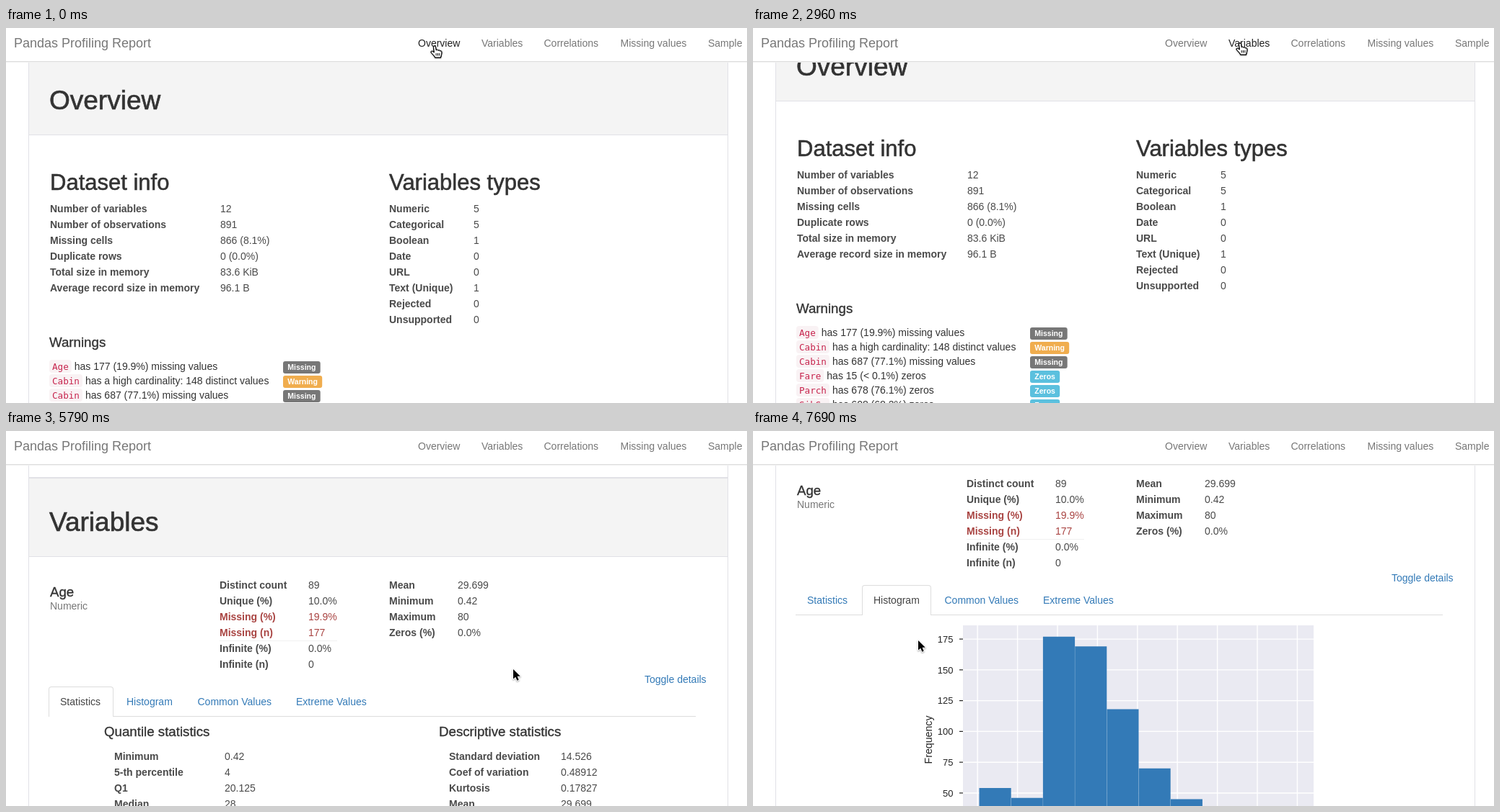
Animation, 1027 px wide and 521 px high, one loop 8000 ms. Source, as an HTML page with a canvas:

```html
<!DOCTYPE html>
<html lang="en">
<head>
<meta charset="utf-8">
<title>Profiling report</title>
<style>
  html, body { margin: 0; width: 100%; height: 100%; overflow: hidden; background: #fff; }
  canvas { display: block; }
</style>
</head>
<body>
<canvas id="stage" width="1027" height="521"></canvas>
<script>
const ctx = document.getElementById('stage').getContext('2d');
const LOOP = 8000, TICK = 148;
const SANS = '"Liberation Sans", Arial, sans-serif';
const MONO = '"DejaVu Sans Mono", monospace';
const BLUE = '#337ab7', DARK_BLUE = '#23527c', RED = '#a94442';
const INK = '#333', LABEL = '#4a4a4a', GREY = '#777', LINE = '#e1e1e6';

// Key poses: [tick, value...]
const SCROLL = [[0, 22], [1, 45], [2, 57], [3, 61], [4, 61], [5, 45], [6, 22], [7, 6], [8, 0],
  [19, 0], [20, 69], [21, 410], [22, 625], [39, 625], [40, 655], [41, 695], [42, 718],
  [49, 718], [50, 735], [51, 756], [52, 766]];
const POINTER = [[0, 594, 25], [4, 594, 25], [8, 330, 287], [9, 330, 287], [13, 230, 154],
  [14, 400, 130], [15, 620, 70], [16, 795, 27], [17, 689, 25], [18, 675, 21], [26, 675, 21],
  [31, 889, 351], [32, 920, 362], [33, 915, 365], [37, 915, 365], [39, 703, 331], [42, 697, 333],
  [45, 300, 318], [46, 225, 300], [47, 203, 291], [49, 203, 291], [52, 229, 291]];
const EXPAND = [[34, 0], [35, 0.15], [36, 0.7], [37, 1]];
const SWITCH_TAB = 49;

const NAV = [['Overview', 571], ['Variables', 659], ['Correlations', 745.5],
  ['Missing values', 851.5], ['Sample', 973]];
const TABS = [['Statistics', 59, 90], ['Histogram', 151, 96],
  ['Common Values', 249.5, 135], ['Extreme Values', 386, 128]];
const DATASET = [['Number of variables', '12'], ['Number of observations', '891'],
  ['Missing cells', '866 (8.1%)'], ['Duplicate rows', '0 (0.0%)'],
  ['Total size in memory', '83.6 KiB'], ['Average record size in memory', '96.1 B']];
const TYPES = [['Numeric', '5'], ['Categorical', '5'], ['Boolean', '1'], ['Date', '0'],
  ['URL', '0'], ['Text (Unique)', '1'], ['Rejected', '0'], ['Unsupported', '0']];
const WARNINGS = [['Age', 'has 177 (19.9%) missing values', 'Missing'],
  ['Cabin', 'has a high cardinality: 148 distinct values', 'Warning'],
  ['Cabin', 'has 687 (77.1%) missing values', 'Missing'],
  ['Fare', 'has 15 (< 0.1%) zeros', 'Zeros'],
  ['Parch', 'has 678 (76.1%) zeros', 'Zeros'],
  ['SibSp', 'has 608 (68.2%) zeros', 'Zeros'],
  ['Ticket', 'has a high cardinality: 681 distinct values', 'Warning']];
const BADGE = { Missing: '#777', Warning: '#f0ad4e', Zeros: '#5bc0de' };
const AGE = [['Distinct count', '89'], ['Unique (%)', '10.0%'], ['Missing (%)', '19.9%', RED],
  ['Missing (n)', '177', RED], ['Infinite (%)', '0.0%'], ['Infinite (n)', '0']];
const AGE_RANGE = [['Mean', '29.699'], ['Minimum', '0.42'], ['Maximum', '80'], ['Zeros (%)', '0.0%']];
const CABIN = [['Distinct count', '148', RED], ['Unique (%)', '16.6%'],
  ['Missing (%)', '77.1%', RED], ['Missing (n)', '687', RED]];
const CABIN_VALUES = [['G6', 4], ['C23 C25 C27', 4], ['B96 B98', 4],
  ['Other values (144)', 192, '#999'], ['(Missing)', 687, RED]];
const QUANTILES = [['Minimum', '0.42'], ['5-th percentile', '4'], ['Q1', '20.125'],
  ['Median', '28'], ['Q3', '38'], ['95-th percentile', '56'], ['Maximum', '80'],
  ['Range', '79.58'], ['Interquartile range', '17.875']];
const DESCRIPTIVE = [['Standard deviation', '14.526'], ['Coef of variation', '0.48912'],
  ['Kurtosis', '0.17827'], ['Mean', '29.699'], ['MAD', '11.323'], ['Skewness', '0.38911'],
  ['Sum', '21205'], ['Variance', '211.02'], ['Memory size', '7.0 KiB']];
const AGE_COUNTS = [54, 46, 177, 169, 118, 70, 45, 24, 9, 2];

const ARROW = new Path2D('M0 0V13.6L3.2 10.7L5.4 15.8L7.7 14.8L5.6 9.8H9.8Z');
const HAND = new Path2D('M-1.5 1.2C-1.2-.4 1-.4 1.4 1.2L2.2 6C3 5 4.6 5.2 5 6.4' +
  'C6 5.6 7.4 6 7.6 7.2C8.6 6.6 9.8 7.2 9.8 8.6C10 12 9 13 8.4 16H.8' +
  'C0 13.5-3 11.5-4.8 8.8C-5.2 7.4-3.6 6.8-2.4 7.8L-.6 9Z');
const KNUCKLES = new Path2D('M2.2 10V13.5M4.5 10V13.5M6.8 10V13.5');

function pose(keys, tick) {
  const next = keys.findIndex(key => key[0] > tick);
  if (next === 0) return keys[0].slice(1);
  if (next < 0) return keys[keys.length - 1].slice(1);
  const a = keys[next - 1], b = keys[next];
  const p = (tick - a[0]) / (b[0] - a[0]);
  return a.slice(1).map((v, i) => v + (b[i + 1] - v) * p);
}

function rect(x, y, w, h, color, radius = 0) {
  ctx.fillStyle = color;
  ctx.beginPath();
  ctx.roundRect(x, y, w, h, radius);
  ctx.fill();
}

// y is the middle of the capitals
function text(s, x, y, { size = 14, color = INK, bold = false, align = 'left', family = SANS } = {}) {
  ctx.font = `${bold ? 'bold ' : ''}${size}px ${family}`;
  ctx.fillStyle = color;
  ctx.textAlign = align;
  ctx.fillText(s, x, Math.round(y + size * 0.36));
  return ctx.measureText(s).width;
}

function heading(s, x, y, size) {
  text(s, x, y, { size });
  ctx.strokeStyle = INK;
  ctx.lineWidth = size * 0.018;
  ctx.strokeText(s, x, Math.round(y + size * 0.36));
}

function rotated(s, x, y, angle, size) {
  ctx.save();
  ctx.translate(x, y);
  ctx.rotate(angle);
  text(s, 0, 0, { size, align: 'center', color: '#262626' });
  ctx.restore();
}

function table(rows, x, valueX, y) {
  rows.forEach(([label, value, color], i) => {
    text(label, x, y + 22 * i, { bold: true, color: color || LABEL });
    text(value, valueX, y + 22 * i, { color: color || LABEL });
  });
}

function clipped(x, y, w, h, draw) {
  ctx.save();
  ctx.beginPath();
  ctx.rect(x, y, w, h);
  ctx.clip();
  draw();
  ctx.restore();
}

function sectionHeader(title, y) {
  rect(31, y, 970, 110, '#f4f4f4');
  rect(31, y, 970, 1, LINE);
  rect(31, y + 109, 970, 1, LINE);
  heading(title, 60, y + 61, 37);
}

function overview() {
  sectionHeader('Overview', 61);
  heading('Dataset info', 61, 236, 31);
  heading('Variables types', 531, 236, 31);
  table(DATASET, 61, 297, 273);
  table(TYPES, 531, 648, 273);
  heading('Warnings', 60, 458, 18.7);
  WARNINGS.forEach(([name, message, kind], i) => {
    const y = 492 + 20 * i;
    ctx.font = `12.6px ${MONO}`;
    const width = ctx.measureText(name).width;
    rect(60, y - 9, width + 8, 18, '#f9f2f4', 4);
    text(name, 64, y + 0.5, { size: 12.6, color: '#c7254e', family: MONO });
    text(message, 72 + width, y);
    ctx.font = `bold 10.5px ${SANS}`;
    rect(384, y - 7, ctx.measureText(kind).width + 12.6, 17, BADGE[kind], 3);
    text(kind, 390.3, y + 1.5, { size: 10.5, bold: true, color: '#fff' });
  });
}

function bars(x, base, width, scale) {
  AGE_COUNTS.forEach((count, i) => {
    const left = x + i * width;
    rect(left, base - count * scale, width, count * scale, BLUE);
    if (i) rect(left - 0.25, base - Math.min(count, AGE_COUNTS[i - 1]) * scale, 0.5, 300, 'rgba(255,255,255,.3)');
  });
}

function miniHistogram() {
  clipped(780, 200, 180, 104.5, () => bars(792, 304.5, 14.45, 0.467));
  [['0', 792], ['50', 882]].forEach(([label, x]) => {
    rect(x - 0.5, 304, 1, 5, INK);
    rotated(label, x - 0.5, 324.5, -Math.PI / 4, 11);
  });
}

function histogram(dy) {
  const base = 729.5 + dy;
  rect(291, 411 + dy, 486, 335, '#eaeaf2');
  for (let i = 0; i < 9; i++) rect(310.5 + i * 55.4, 411 + dy, 1.4, 335, '#fff');
  for (let v = 0; v <= 175; v += 25) {
    const y = base - v * 1.711;
    rect(291, y - 0.7, 486, 1.4, '#fff');
    rect(286, y - 0.6, 5, 1.2, '#262626');
    text(v, 277.5, y, { size: 13, align: 'right', color: '#262626' });
  }
  clipped(291, 411 + dy, 486, 318.5, () => bars(313.5, base, 44.2, 1.711));
  rotated('Frequency', 243, 570 + dy, -Math.PI / 2, 14.2);
}

function details(top, active, hovered) {
  const line = top + 41;
  rect(59, line, 897, 1, '#ddd');
  TABS.forEach(([label, x, width], i) => {
    let color = BLUE;
    if (i === active) {
      rect(x, top, width, 42, '#ddd', [4, 4, 0, 0]);
      rect(x + 1, top + 1, width - 2, 41, '#fff', [3, 3, 0, 0]);
      color = '#444';
    } else if (i === hovered) {
      rect(x, top, width, 41, '#eee', [4, 4, 0, 0]);
      color = DARK_BLUE;
    }
    text(label, x + 16, top + 21, { color });
  });
  if (active === 1) return histogram(top - 355);
  heading('Quantile statistics', 136, top + 62, 18.7);
  heading('Descriptive statistics', 600, top + 62, 18.7);
  table(QUANTILES, 150, 303, top + 97);
  table(DESCRIPTIVE, 614, 769, top + 97);
}

function cabin(y) {
  heading('Cabin', 61, y + 49, 18.7);
  text('Categorical', 61, y + 69, { color: GREY });
  table(CABIN, 296, 419, y + 40);
  [51, 73, 117].forEach(dy => rect(296, y + dy, 163, 1, '#f1f1f1'));
  CABIN_VALUES.forEach(([label, count, color], i) => {
    const rowY = y + 40 + 22 * i;
    const width = Math.max(1.3, count * 0.3175);
    text(label, 744, rowY, { align: 'right', color: color === RED ? RED : INK });
    rect(752, rowY - 10, width, 20, color || BLUE, color ? 3 : 0);
    if (color) text(count, 752 + width / 2, rowY, { size: 12, align: 'center', color: '#fff' });
    else text(count, 757, rowY - 2, { size: 12 });
  });
}

// Coordinates here put the section header at y = 65
function variables(state) {
  const { open, linkY, active, hover } = state;
  rect(31, 64, 970, 1, LINE);
  sectionHeader('Variables', 65);
  heading('Age', 61, 223, 18.7);
  text('Numeric', 61, 243, { color: GREY });
  table(AGE, 296, 419, 214);
  rect(296, 291, 163, 1, '#f1f1f1');
  table(AGE_RANGE, 531, 626, 214);
  if (open < 1) clipped(780, 200, 180, 145 * (1 - open), miniHistogram);
  const hot = hover === 'toggle';
  const width = text('Toggle details', 885, linkY, { color: hot ? DARK_BLUE : BLUE });
  if (hot) rect(885, linkY + 7, width, 1, DARK_BLUE);
  const panel = 310 * open, rowEnd = linkY + 38 + panel;
  if (open) clipped(32, linkY + 9, 968, panel, () => details(linkY + 10, active, hover));
  rect(31, rowEnd, 970, 1, LINE);
  cabin(rowEnd);
}

function navbar(hover) {
  rect(0, 0, 1027, 46, '#fff');
  rect(0, 46, 1027, 1, '#dedede');
  rect(0, 47, 1027, 1, '#f0f0f0');
  text('Pandas Profiling Report', 11, 21, { size: 18, color: GREY });
  NAV.forEach(([label, x]) => text(label, x, 21, { color: hover === label ? '#222' : GREY }));
}

function findHover(x, y, sectionY, linkY, open, active) {
  if (y < 47) {
    ctx.font = `14px ${SANS}`;
    const item = NAV.find(([label, left]) => x > left - 15 && x < left + ctx.measureText(label).width + 15);
    return item ? item[0] : null;
  }
  const sy = y - sectionY;
  if (x > 885 && x < 971 && sy > linkY - 5 && sy < linkY + 10) return 'toggle';
  if (open === 1 && sy > linkY + 10 && sy < linkY + 51) {
    const tab = TABS.findIndex(([, left, width]) => x > left && x < left + width);
    if (tab >= 0 && tab !== active) return tab;
  }
  return null;
}

function drawPointer(x, y, hand) {
  ctx.save();
  ctx.translate(x, y);
  ctx.lineJoin = 'round';
  ctx.shadowColor = 'rgba(0,0,0,.35)';
  ctx.shadowBlur = 2;
  ctx.shadowOffsetY = 1;
  ctx.strokeStyle = hand ? '#000' : '#fff';
  ctx.lineWidth = hand ? 1.4 : 2;
  ctx.stroke(hand ? HAND : ARROW);
  ctx.shadowColor = 'transparent';
  ctx.fillStyle = hand ? '#fff' : '#000';
  ctx.fill(hand ? HAND : ARROW);
  if (hand) {
    ctx.lineWidth = 1;
    ctx.stroke(HAND);
    ctx.stroke(KNUCKLES);
  }
  ctx.restore();
}

function render(time) {
  const tick = Math.floor((time % LOOP + 6) / TICK);
  const [scroll] = pose(SCROLL, tick);
  const [x, y] = pose(POINTER, tick);
  const [open] = pose(EXPAND, tick);
  const active = tick >= SWITCH_TAB ? 1 : 0;
  const linkY = Math.round(Math.max(345, 357 - 40 * open));
  const sectionY = 625 - scroll;
  const hover = findHover(x, y, sectionY, linkY, open, active);

  rect(0, 0, 1027, 521, '#fff');
  ctx.save();
  ctx.translate(0, Math.round(-scroll));
  overview();
  ctx.translate(0, 625);
  variables({ open, linkY, active, hover });
  ctx.restore();

  const edgeTop = Math.max(46, 61 - scroll);
  rect(31, edgeTop, 1, 521, LINE);
  rect(1000, edgeTop, 1, 521, LINE);
  navbar(hover);
  drawPointer(Math.round(x), Math.round(y), hover !== null);
}

const start = performance.now();
function loop() {
  render(performance.now() - start);
  requestAnimationFrame(loop);
}
loop();
</script>
</body>
</html>
```
